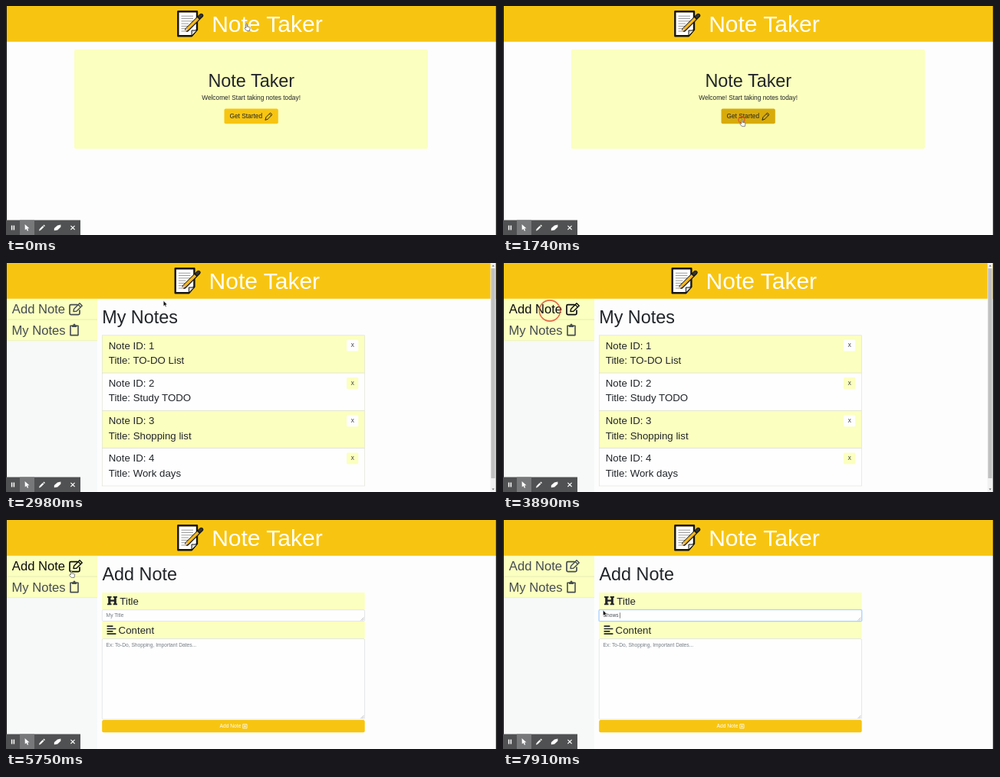
An HTML page for the animation above (8 s loop, 640x300 px).

```html
<!DOCTYPE html>
<html lang="en">
<head>
<meta charset="utf-8">
<title>Note Taker</title>
<style>
html, body { margin: 0; width: 100%; height: 100%; overflow: hidden; background: #fdfdfd; }
svg { display: block; width: 100vw; height: 100vh; font-family: "Liberation Sans", Arial, sans-serif; }
text { white-space: pre; }
</style>
</head>
<body>
<svg id="stage" viewBox="0 0 640 300"></svg>
<script>
const LOOP = 8000;
const GOLD = '#f7c511', GOLD_DARK = '#d8ab0b', CREAM = '#fbffbf', INK = '#212529', LINK = '#454c52', MUTED = '#747c83';

const rect = (x, y, w, h, fill, extra = '') =>
  `<rect x="${x}" y="${y}" width="${w}" height="${h}" fill="${fill}" ${extra}/>`;
const text = (x, y, size, str, fill = INK, extra = '') =>
  `<text x="${x}" y="${y}" font-size="${size}" fill="${fill}" ${extra}>${str}</text>`;
const line = (d, stroke, width = 1, extra = '') =>
  `<path d="${d}" fill="none" stroke="${stroke}" stroke-width="${width}" ${extra}/>`;
const shape = (d, fill, extra = '') => `<path d="${d}" fill="${fill}" ${extra}/>`;
const group = (id, body, extra = '') => `<g id="${id}" ${extra}>${body}</g>`;
const round = 'stroke-linejoin="round" stroke-linecap="round"';

function memo() {
  let rules = '';
  for (let i = 0; i < 7; i++) rules += `M228.5 ${13.2 + i * 3.3}H${i < 3 ? 244 : 241 - i}`;
  return shape('M224.3 7.3H249V31L242 39.2H224.3Z', '#fff', `stroke="#151515" stroke-width="2.4" ${round}`) +
    line(rules, '#9a9a9a', 1) +
    shape('M242 39V32H249Z', '#ddd', 'stroke="#151515" stroke-width="1"') +
    line('M254.5 12.5L236 31', '#151515', 5.4, round) +
    line('M250.5 16.2L236.6 30', '#f5b81e', 3.4) +
    shape('M238 31.2L235.3 28.5L231.8 34.6Z', '#e8c79a') +
    line('M254.5 12.2L252.6 14.1', '#333', 3.6, round);
}

function sidebar() {
  const edit = line('M93 54.6H84.6Q83 54.6 83 56.2V66Q83 67.6 84.6 67.6H94.4Q96 67.6 96 66V62', 'currentColor', 1.7, round) +
    shape('M88 63.5L88.6 60.2L96 52.8L99.2 56L91.8 63.2Z', 'none', `stroke="currentColor" stroke-width="1.4" ${round}`) +
    line('M94.2 54.8L97.3 57.8', 'currentColor', 1.2);
  const clip = line('M84 82.2H94V94.6H84Z', 'currentColor', 1.6, round) +
    shape('M86 81.5H87.4Q87.6 79.4 89 79.4Q90.4 79.4 90.6 81.5H92V84H86Z', 'currentColor');
  return rect(1, 47, 118, 253, '#f7f9f9') + rect(1, 47, 118, 55, CREAM) +
    rect(1, 73.7, 118, 0.7, '#dfe3ad') + rect(1, 101.5, 118, 0.6, '#e6e9c4') +
    group('addLink', text(7.8, 66.4, 16.64, 'Add Note', 'currentColor') + edit) +
    `<g color="${LINK}">` + text(7.4, 93.7, 16.64, 'My Notes', 'currentColor') + clip + '</g>';
}

function home() {
  const pencil = shape('M338 149L339 145.6L344.6 140L347 142.4L341.4 148Z', 'none', `stroke="${INK}" stroke-width="1" ${round}`) +
    line('M343.3 141.3L345.7 143.7', INK, 0.9);
  return rect(89, 57, 461, 130, CREAM, 'rx="2"') +
    text(319.8, 105.6, 23.4, 'Note Taker', INK, 'text-anchor="middle"') +
    text(319.6, 122.6, 8.32, 'Welcome! Start taking notes today!', INK, 'text-anchor="middle"') +
    rect(284.5, 134.6, 70.3, 19.6, GOLD, 'rx="2" id="start"') +
    text(291.5, 147.3, 8.32, 'Get Started') + pencil;
}

function notes() {
  const titles = ['TO-DO List', 'Study TODO', 'Shopping list', 'Work days'];
  const rows = titles.map((title, i) => {
    const y = 94.8 + i * 49.3, odd = i % 2;
    return rect(125.3, y, 342.2, 49.3, odd ? '#fefefe' : CREAM, 'stroke="#dcdfd0" stroke-width="0.6"') +
      text(133.8, y + 17.7, 13.25, 'Note ID: ' + (i + 1)) +
      text(133.8, y + 37.1, 13.25, 'Title: ' + title) +
      rect(444, y + 5.8, 15.3, 15, odd ? CREAM : '#fefefe', 'rx="1.5"') +
      text(451.7, y + 15.5, 6.5, 'X', INK, 'text-anchor="middle"');
  }).join('');
  const bar = rect(631.5, 0, 7, 300, '#f1f1f1') + rect(632.3, 7, 5.2, 275, '#c1c1c1') +
    shape('M633.4 4.4H636.6L635 2.4Z', '#666') + shape('M633.4 295.6H636.6L635 297.6Z', '#666');
  return text(125.2, 79, 23.4, 'My Notes') + rows + bar;
}

function form() {
  const grip = (x, y) => line(`M${x - 4} ${y}L${x} ${y - 4}M${x - 2} ${y}L${x} ${y - 2}`, '#999', 0.6);
  const heading = shape('M132 100H137.6V101.8H136.4V104.6H140.8V101.8H139.6V100H145V101.8H143.8V109.4H145V111.2H139.6V109.4H140.8V106.8H136.4V109.4H137.6V111.2H132V109.4H133.2V101.8H132Z', INK);
  const align = line('M131.6 139.2H139.4M131.6 142.5H143.4M131.6 145.8H139.4M131.6 149.1H143.4', INK, 1.7);
  const plus = line('M308.8 267.6H314V272.8H308.8ZM311.4 268.8V271.6M310 270.2H312.8', '#fff', 0.8);
  const edge = 'stroke="#d3d8dc" stroke-width="0.6" rx="1.5"';
  return text(125.4, 79, 23.4, 'Add Note') +
    rect(125.2, 95, 342.5, 22.6, CREAM) + heading + text(148.3, 110.7, 13.3, 'Title') +
    rect(125.2, 133, 342.5, 22.5, CREAM) + align + text(146.6, 149.2, 13.3, 'Content') +
    group('focus', rect(124.3, 116.7, 344.2, 16.8, '#bfdeff', 'rx="2.2"')) +
    rect(125.3, 117.7, 342.2, 14.8, '#fefefe', edge + ' id="field"') + grip(466.5, 131.6) +
    text(130.6, 127.2, 6.66, 'My Title', MUTED, 'id="entry"') +
    rect(152.1, 121.3, 0.6, 7.4, '#333', 'id="caret"') +
    rect(125.3, 155.6, 342.2, 105.4, '#fefefe', edge) + grip(466.5, 260) +
    text(130.6, 165.8, 6.66, 'Ex: To-Do, Shopping, Important Dates...', MUTED) +
    rect(125.2, 262, 342.5, 16.2, GOLD, 'rx="2"') +
    text(278.6, 272.4, 6.66, 'Add Note', '#fff') + plus;
}

function toolbar() {
  return rect(0, 280.5, 97, 19.5, '#505152') + rect(18, 280.5, 19, 19.5, '#77787a') +
    line('M7.6 287.6V293.4M10.4 287.6V293.4', '#fff', 1.5) +
    shape('M24.6 286L24.8 293.6L26.6 292L27.9 294.8L29.2 294.2L28 291.4L30.4 291.2Z', '#fff') +
    line('M44.6 292.8L48.6 288.8', '#fff', 2.3) + line('M49.2 288.2L50.2 287.2', '#fff', 2.3) +
    shape('M43 294.4L43.6 292L45.4 293.8Z', '#fff') +
    shape('M62.8 291.2L67 287.4L71.4 286.6V289.4L67.2 293.6L62.8 294.2Z', '#fff') +
    line('M84.4 287.8L89.6 293M89.6 287.8L84.4 293', '#fff', 1.1);
}

const HAND = shape('M2.4 5.6V1.2Q2.4 .4 3.1 .4Q3.8 .4 3.8 1.2V4L7 4.6Q7.7 4.8 7.6 5.8L7 9.4H3.2L.6 6.4Q.6 5.2 1.6 5.4Z',
  '#fff', `stroke="#555" stroke-width="0.7" ${round}`);
const ARROW = shape('M.3 .3V7.2L1.9 5.8L3 8.2L4 7.8L3 5.4L5 5.2Z', '#111', 'stroke="#fff" stroke-width="0.35"');

const stage = document.getElementById('stage');
stage.innerHTML = rect(0, 0, 640, 300, '#fdfdfd') +
  rect(0, 0, 640, 46.8, GOLD) +
  group('brand', memo() + text(268.2, 33.8, 30, 'Note Taker', '#fff')) +
  group('side', sidebar()) + group('home', home()) + group('notes', notes()) + group('form', form()) +
  rect(0, 0, 1, 300, '#111') + rect(638.7, 0, 1.3, 300, '#111') + toolbar() +
  '<circle id="ring" fill="none" stroke="#e0452c" stroke-width="1.6"/>' +
  group('hand', HAND) + group('arrow', ARROW);

const el = {};
stage.querySelectorAll('[id]').forEach(n => el[n.id] = n);

// Each track holds [start time, value...]; a value stays until the next start.
const pages = [[0, 'home'], [1870, 'notes'], [4920, 'form']];
const cursor = [
  [0, 'hand', 310.5, 23], [100, 'arrow', 319.5, 72], [160, ''],
  [450, 'hand', 308.3, 148.3], [2030, 'arrow', 311, 148.5], [2690, 'arrow', 306.4, 144.4],
  [2850, 'arrow', 268, 108], [2980, 'arrow', 205, 49.3], [3110, 'arrow', 182.6, 51],
  [3440, 'hand', 78, 65], [3600, ''],
  [5750, 'hand', 82, 66], [5880, 'arrow', 108, 96], [6010, 'arrow', 130.2, 118], [6170, ''],
  [7910, 'arrow', 130.2, 118]
];
const rings = [
  [0, 0], [1610, 12, 311, 149, 0.7], [1740, 4, 311, 149, 0.6], [1870, 0],
  [3890, 13.6, 61, 62.5, 0.8], [5050, 0], [6370, 12, 133.5, 120.5, 0.6], [6500, 0]
];
const typed = [[0, 'My Title'], [6930, 'Sh'], [7290, 'Show'], [7750, 'Shows']];
const buttons = [[0, GOLD], [450, '#e8b80e'], [580, GOLD_DARK]];

const at = (track, t) => track.filter(k => k[0] <= t).pop().slice(1);
const show = (node, on) => node.style.display = on ? '' : 'none';

function render(t) {
  const [page] = at(pages, t);
  for (const name of ['home', 'notes', 'form']) show(el[name], page === name);
  show(el.side, page !== 'home');
  el.brand.setAttribute('transform', `translate(${page === 'notes' ? -3.6 : 0} 0)`);
  el.start.setAttribute('fill', at(buttons, t)[0]);
  el.addLink.setAttribute('color', t >= 3440 && t < 5880 ? '#0b0d0f' : LINK);

  const focused = t >= 6370, [value] = at(typed, t);
  show(el.focus, focused);
  el.field.setAttribute('stroke', focused ? '#8fc1f5' : '#d3d8dc');
  el.entry.textContent = value;
  el.entry.setAttribute('fill', t >= 6930 ? '#495057' : MUTED);
  show(el.caret, t >= 7910);

  const [kind, x, y] = at(cursor, t);
  for (const name of ['hand', 'arrow']) show(el[name], kind === name);
  if (kind) el[kind].setAttribute('transform', `translate(${x} ${y})`);

  const [r, cx, cy, alpha] = at(rings, t);
  show(el.ring, r);
  if (r) Object.entries({ r, cx, cy, opacity: alpha }).forEach(([k, v]) => el.ring.setAttribute(k, v));
}

const begin = performance.now();
function tick(now) {
  render(Math.max(0, now - begin) % LOOP);
  requestAnimationFrame(tick);
}
render(0);
requestAnimationFrame(tick);
</script>
</body>
</html>
```
